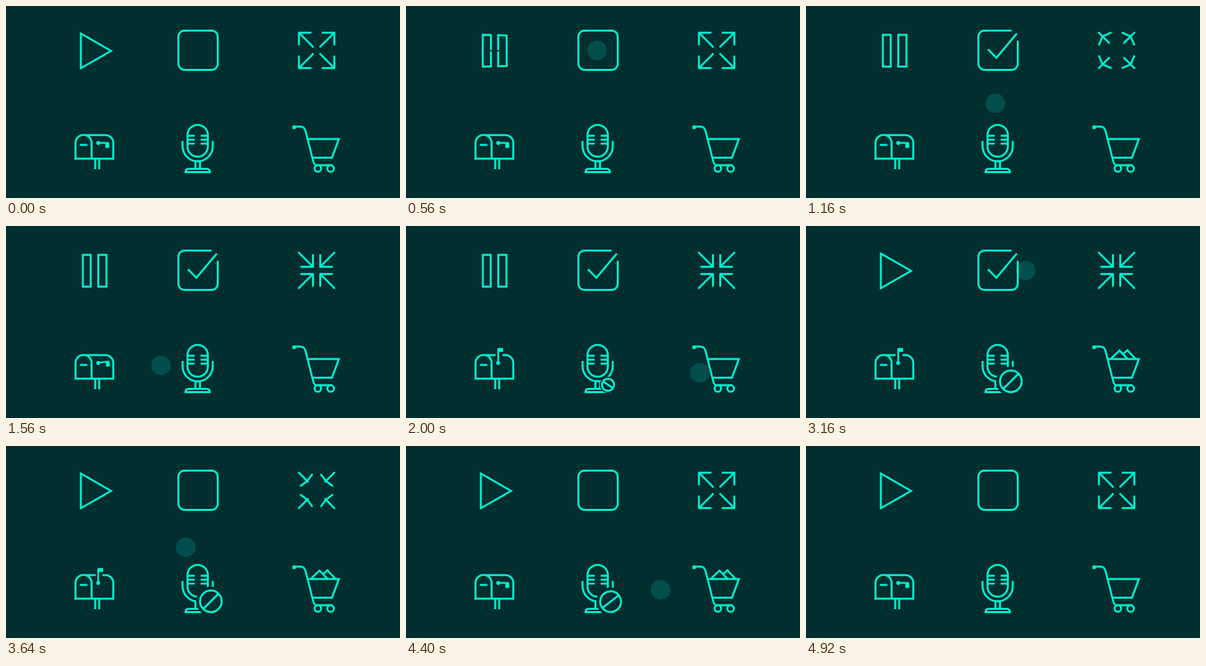
Write an HTML page that moves like this. It is 600 by 293 pixels and loops after 5200 ms.

```html
<!DOCTYPE html>
<html lang="en">
<head>
<meta charset="utf-8">
<title>Icon toggles</title>
<style>
  html, body { margin: 0; width: 100%; height: 100%; overflow: hidden; background: #012e2f; }
  svg { display: block; width: 100vw; height: 100vh; }
  .line { fill: none; stroke: #00f0d0; stroke-width: 3; }
  .solid { fill: #00f0d0; stroke: none; }
  .mask { fill: #012e2f; stroke: none; }
  .round { stroke-linecap: round; stroke-linejoin: round; }
</style>
</head>
<body>
<svg viewBox="0 0 600 293">
  <defs>
    <clipPath id="aboveRim"><rect x="455" y="180" width="60" height="23"/></clipPath>
  </defs>
  <circle id="cursor" r="15" fill="#014e4c"/>
  <g class="line">
    <path id="play"/>

    <path d="M322.5 53V88a9.5 9.5 0 0 1-9.5 9.5H272a9.5 9.5 0 0 1-9.5-9.5V47a9.5 9.5 0 0 1 9.5-9.5H313"/>
    <path id="corner" d="M313 37.5a9.5 9.5 0 0 1 9.5 9.5V53" pathLength="1"/>
    <path id="tick" d="M277 66L290 79L321 42" pathLength="1"/>

    <path id="arrows" class="round"/>

    <g transform="translate(-.6 0)">
      <path d="M119 197H152a12 12 0 0 1 12 12V233H106.5V209a12.25 12.25 0 0 1 24.5 0V233M113 212H124.5M136.5 233V249M142.5 233V249"/>
      <rect id="gap" class="mask" x="137" y="194" width="10.5" height="6"/>
      <circle class="solid" cx="141" cy="209" r="3"/>
      <g id="flag">
        <path id="pole" stroke-width="2.6"/>
        <rect id="banner" class="solid" x="-.5" width="8" height="6"/>
      </g>
    </g>

    <g transform="translate(-.6 0)">
      <rect x="277" y="181.5" width="31" height="48.5" rx="15.5"/>
      <path d="M277 198H288M277 204H288M277 210H288M297 198H308M297 204H308M297 210H308"/>
      <path d="M269.5 206V214a23 23 0 0 0 46 0V206M289 237V248M296 237V248"/>
      <path d="M274 253.5q0-5 5-5H306q5 0 5 5Z"/>
    </g>
    <g id="ban">
      <circle id="halo" class="mask"/>
      <circle id="ring"/>
      <path id="slash"/>
    </g>

    <g transform="translate(-.6 0)">
      <g clip-path="url(#aboveRim)">
        <path id="goods" d="M464 203.5L478 190L491 203.5M483.5 195.5L490 189.5L503 203.5"/>
      </g>
      <path d="M440 184H449q5.500 0 7.5 6L468 235q2 8 5 8H497M460 203H507.5L497 231.5H467"/>
      <circle class="solid" cx="439.5" cy="185" r="3"/>
      <circle cx="475.5" cy="248" r="5" fill="#012e2f"/>
      <circle cx="495" cy="248" r="5" fill="#012e2f"/>
    </g>
  </g>
</svg>
<script>
const LOOP = 5200, SPAN = 400;
const $ = id => document.getElementById(id);
const set = (id, attrs) => {
  for (const key in attrs) $(id).setAttribute(key, attrs[key]);
};
const show = on => on ? 'visible' : 'hidden';
const clamp = x => Math.min(1, Math.max(0, x));
const mix = (a, b, p) => a + (b - a) * p;
const mixPoint = (a, b, p) => a.map((v, i) => mix(v, b[i], p));
const sine = x => 0.5 - 0.5 * Math.cos(Math.PI * clamp(x));
const quint = x => {
  x = clamp(x);
  return x < 0.5 ? 16 * x ** 5 : 1 - 16 * (1 - x) ** 5;
};

// Each icon: where the cursor stops, how long after arrival it reacts
const icons = [
  { at: [135, 70], delay: 80, draw: drawPlay },
  { at: [292, 68], delay: 80, draw: drawCheck },
  { at: [473, 68], delay: 25, draw: drawArrows },
  { at: [137, 214], delay: 80, draw: drawMail },
  { at: [292, 212], delay: 80, draw: drawMic },
  { at: [473, 226], delay: -70, draw: drawCart }
];

// The cursor visits every icon twice: once to switch on, once to switch off
const laps = [{ start: 204, step: 378 }, { start: 2648, step: 388 }];
const arrival = (lap, i) => laps[lap].start + i * laps[lap].step;

const visits = laps.flatMap((_, lap) =>
  icons.map((icon, i) => ({ time: arrival(lap, i), at: icon.at })));
const lastVisit = visits[visits.length - 1].time;
const stops = [
  { time: -170, at: [-185, 185] },
  ...visits,
  { time: lastVisit + 380, at: [823, 226] }
];

function drawCursor(t) {
  const next = Math.max(1, stops.findIndex(s => s.time > t));
  const a = stops[next - 1], b = stops[next];
  const [cx, cy] = mixPoint(a.at, b.at, sine((t - a.time) / (b.time - a.time)));
  set('cursor', { cx, cy, visibility: show(t < stops[stops.length - 1].time) });
}

// Half of the play/pause shape; its inner edge closes from both ends
function half(from, to, p) {
  const pts = from.map((point, i) => mixPoint(point, to[i], p));
  const [a, , , b] = pts;
  if (p > 0.999) return `M${pts.join('L')}Z`;
  const reach = (b[1] - a[1]) / 2 * p;
  return `M${[[a[0], a[1] + reach], ...pts, [b[0], b[1] - reach]].join('L')}`;
}

function drawPlay(p) {
  const top = [114, 42], tip = [160, 68.5], low = [114, 95];
  if (p < 0.001) return set('play', { d: `M${[top, tip, low].join('L')}Z` });
  const upper = mixPoint(top, tip, 0.5), lower = mixPoint(low, tip, 0.5);
  const bar = (inner, outer) => [[inner, 44], [outer, 44], [outer, 92.5], [inner, 92.5]];
  set('play', {
    d: half([upper, top, low, lower], bar(129, 117), p) +
       half([upper, tip, tip, lower], bar(140.5, 153), p)
  });
}

function reveal(id, p) {
  set(id, { 'stroke-dasharray': `${p} 2`, visibility: show(p > 0.002) });
}

function drawCheck(p) {
  reveal('tick', p);
  reveal('corner', 1 - p);
}

// Heads slide inward along the shafts while their arms swing over
function drawArrows(p) {
  const bend = Math.sin(Math.PI * p);
  const tip = mix(27, 5.5, p), inner = 5.5 + 8 * bend, arm = 18 - 6 * bend;
  const swing = mix(45, 135, p);
  let d = '';
  for (const sx of [-1, 1]) for (const sy of [-1, 1]) {
    const at = (x, y) => `${473 + sx * x} ${67.7 + sy * y}`;
    const end = side => {
      const a = (225 + side * swing) * Math.PI / 180;
      return at(tip + arm * Math.cos(a), tip + arm * Math.sin(a));
    };
    d += `M${at(27, 27)}L${at(inner, inner)}M${end(1)}L${at(tip, tip)}L${end(-1)}`;
  }
  set('arrows', { d });
}

function drawMail(p) {
  const len = mix(16, 22, p);
  set('flag', { transform: `translate(141 209) rotate(${90 - 90 * p})` });
  set('pole', { d: `M0 0V${-len}` });
  set('banner', { y: -len - 0.8 });
  set('gap', { opacity: clamp(p * 4 - 2.5) });
}

function drawMic(p) {
  const r = 16.5 * p;
  set('ban', {
    transform: `translate(${302 + 10 * p} ${249 - 12 * p}) rotate(${135 - 180 * p})`,
    visibility: show(p > 0.005)
  });
  set('halo', { r: r + 6 * p });
  set('ring', { r });
  set('slash', { d: `M${-r} 0H${r}` });
}

function drawCart(p) {
  set('goods', { transform: `translate(0 ${17 * (1 - p)})`, visibility: show(p > 0.005) });
}

function draw(t) {
  drawCursor(t);
  icons.forEach(({ delay, draw }, i) => {
    const progress = lap => quint((t - arrival(lap, i) - delay) / SPAN);
    draw(progress(0) - progress(1));
  });
}

const start = performance.now();
function frame() {
  draw((performance.now() - start) % LOOP);
  requestAnimationFrame(frame);
}
frame();
</script>
</body>
</html>
```
